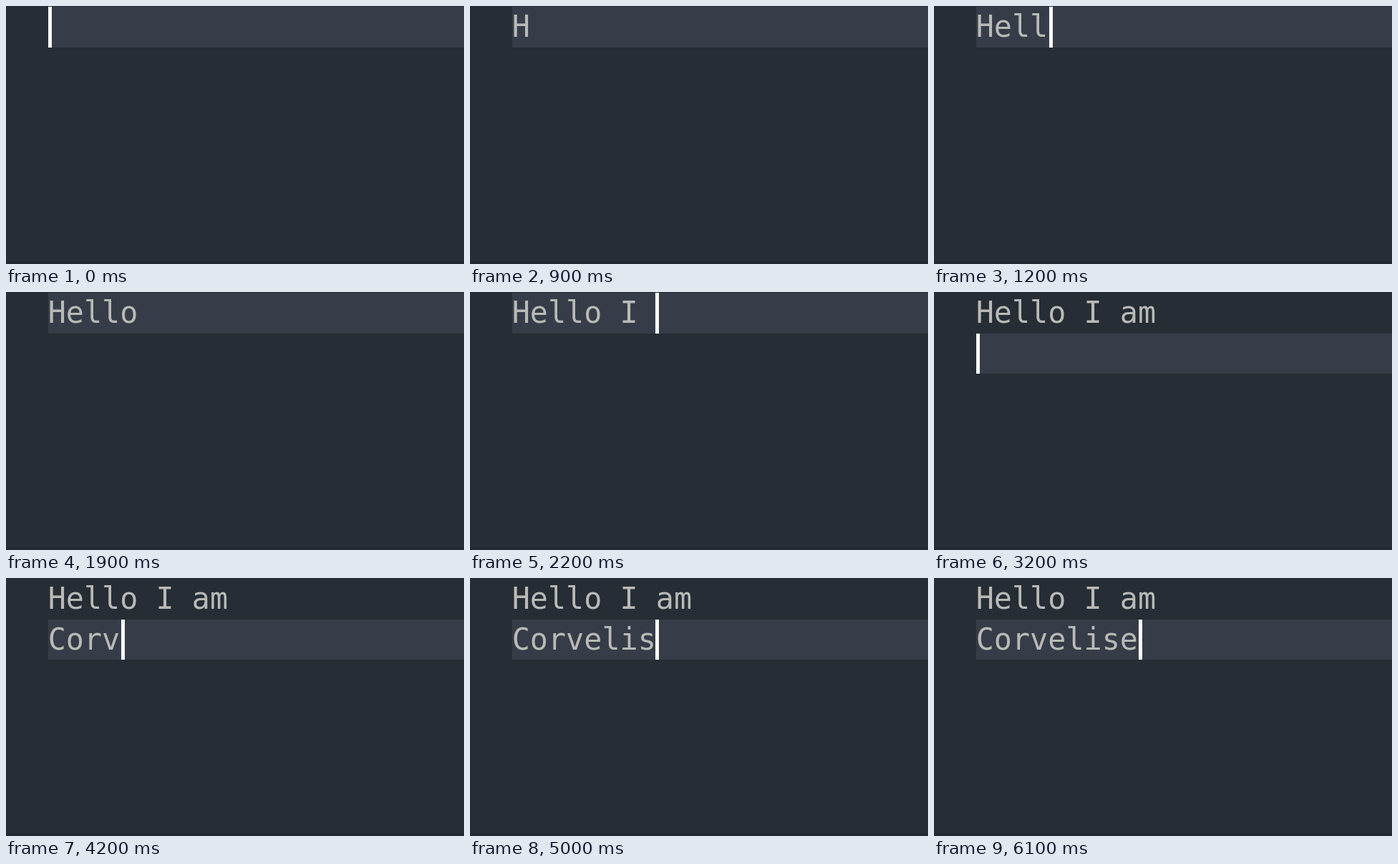
Animation, 640 px wide and 360 px high, one loop 6400 ms. Source, as an HTML page with a canvas:

```html
<!DOCTYPE html>
<html lang="en">
<head>
<meta charset="utf-8">
<title>Typing in an editor</title>
<style>
  html, body { margin: 0; width: 100%; height: 100%; overflow: hidden; background: #262d34; }
  canvas { display: block; }
</style>
</head>
<body>
<canvas id="stage" width="640" height="360"></canvas>
<script>
const ctx = document.getElementById('stage').getContext('2d');
const LOOP = 6400, BLINK = 500, KEY_GAP = 100;
const COLORS = {
  back: '#262d34', line: '#363d48', edge: '#242a31', text: '#b9bab7', caret: '#f9fbf6'
};

// The editor is drawn on a coarse grid of cells, enlarged to the stage
const CELL = 8 / 3, MARGIN = 22, CHAR = 9.43;
const LEFT = MARGIN * CELL;
const ROW_HEIGHT = 56.5, ASCENT = 42;
const FONT_SIZE = CHAR * CELL / 0.602;

const rowTop = row => Math.round(1.3 + row * ROW_HEIGHT);
const caretX = column => Math.floor((MARGIN + Math.round(column * CHAR)) * CELL) + 1;

// Bursts of typing: start in ms, then one key every KEY_GAP
const BURSTS = [
  [400, 'H'], [1000, 'ello '], [2000, 'I'], [2200, ' '], [2300, 'am '], [3200, '\n'],
  [3400, 'C'], [3600, 'o'], [3900, 'r'], [4200, 've'], [4500, 'li'], [5000, 'se']
];
const KEYS = BURSTS.flatMap(([start, keys]) =>
  [...keys].map((key, i) => ({ key, at: start + i * KEY_GAP })));
// The caret blinks on 200 ms before the loop starts over
const IDLE = { at: -200 };

function box(color, x, y, w, h) {
  ctx.fillStyle = color;
  ctx.fillRect(x, y, w, h);
}

function draw(time) {
  const typed = KEYS.filter(k => k.at <= time);
  const lines = typed.map(k => k.key).join('').split('\n');
  const row = lines.length - 1;
  const top = rowTop(row), height = rowTop(row + 1) - top;
  const last = typed.at(-1) || IDLE;
  const caretOn = Math.floor((time - last.at) / BLINK) % 2 === 0;

  box(COLORS.back, 0, 0, 640, 360);
  box(COLORS.edge, 0, 356, 640, 4);
  box(COLORS.line, caretX(0), top, 640, height);

  ctx.font = `${FONT_SIZE}px "DejaVu Sans Mono", monospace`;
  ctx.fillStyle = COLORS.text;
  lines.forEach((line, i) => ctx.fillText(line, LEFT, rowTop(i) + ASCENT));

  if (caretOn) box(COLORS.caret, caretX(lines[row].length), top, 5, height);
}

function tick() {
  draw(performance.now() % LOOP);
  requestAnimationFrame(tick);
}
tick();
</script>
</body>
</html>
```
